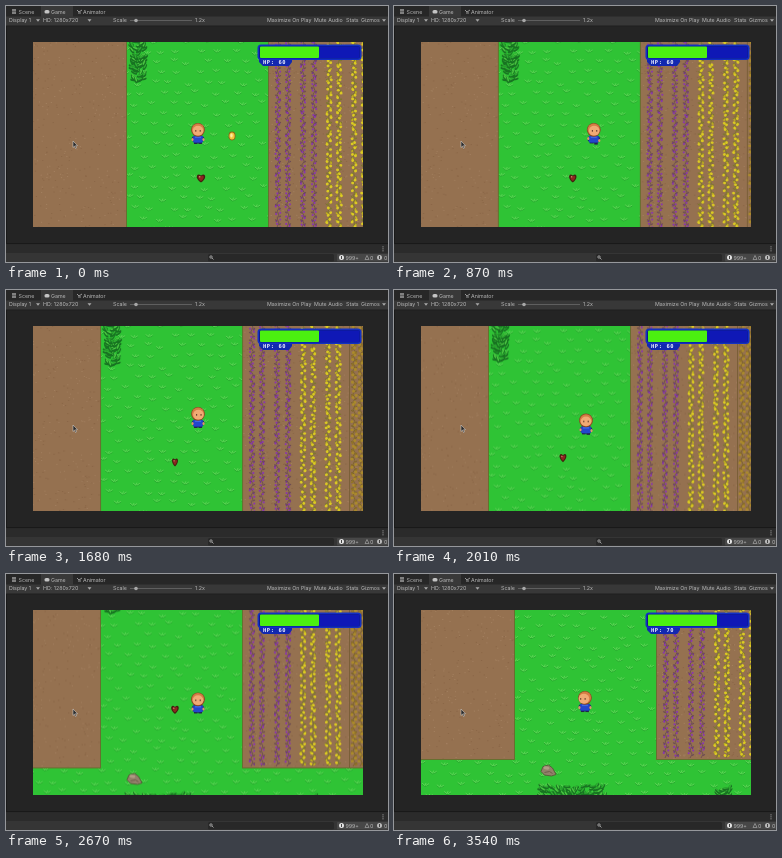
Write an HTML page with a canvas that moves like this. It is 382 px wide and 256 px high and loops after 3570 ms.

```html
<!DOCTYPE html>
<html lang="en">
<head>
<meta charset="utf-8">
<title>Farm game view</title>
<style>
  html, body { margin: 0; width: 100%; height: 100%; overflow: hidden; background: #242424; }
  canvas { position: absolute; left: 27px; top: 36px; width: 330px; height: 185px; }
  svg { position: absolute; left: 0; top: 0; }
  text { font: 5.3px Inter, "Open Sans", sans-serif; fill: #b9b9b9; }
  #hp { font: bold 5.4px "DejaVu Sans Mono", monospace; fill: #f2f4ff; letter-spacing: .6px; }
</style>
</head>
<body>
<canvas id="view" width="330" height="185"></canvas>
<svg width="382" height="256" viewBox="0 0 382 256">
  <rect width="382" height="11" fill="#272727"/>
  <rect x="35" width="32" height="11" fill="#393939"/>
  <rect y="10.5" width="382" height="9.5" fill="#383838"/>
  <rect y="19.5" width="382" height="1" fill="#1f1f1f"/>
  <rect y="20" width="1" height="217" fill="#191919"/>
  <rect y="237" width="382" height="1.2" fill="#191919"/>
  <rect y="238.2" width="382" height="9" fill="#2b2b2b"/>
  <rect y="247" width="382" height="9" fill="#353535"/>
  <rect x="202" y="248" width="126" height="7.5" rx="1.5" fill="#282828"/>
  <rect x="331" y="248" width="51" height="7.5" rx="1" fill="#474747"/>
  <g fill="none" stroke="#b4b4b4" stroke-width=".8">
    <path d="M6 4h4M6 7h4M7 3v5M9 3v5"/>
    <path d="M71 4l2 2 3-2M72 7h3"/>
    <circle cx="205" cy="251" r="1.2"/><path d="M206 252l1.5 1.5"/>
    <path d="M359 253.5l2-4 2 4z" stroke="#999"/>
    <path d="M124 14.5h62" stroke="#6a6a6a"/>
  </g>
  <rect x="38.5" y="4" width="5" height="3.6" rx="1.6" fill="#c4c4c4"/>
  <circle cx="130" cy="14.5" r="1.8" fill="#a8a8a8"/>
  <path d="M30 13.3h4l-2 2.4zM81.5 13.3h4l-2 2.4zM376 13.3h4l-2 2.4z" fill="#a8a8a8"/>
  <g fill="#aaa"><circle cx="377" cy="240.8" r=".6"/><circle cx="377" cy="242.8" r=".6"/><circle cx="377" cy="244.8" r=".6"/></g>
  <circle cx="335.5" cy="251.5" r="2.5" fill="#e4e4e4"/><rect x="335" y="250" width="1" height="3" fill="#444"/>
  <circle cx="373.5" cy="251.5" r="2.5" fill="#bbb"/><rect x="373" y="250" width="1" height="3" fill="#444"/>
  <text x="12.5" y="7.8">Scene</text>
  <text x="45" y="7.8">Game</text>
  <text x="77" y="7.8">Animator</text>
  <text x="3" y="16.3">Display 1</text>
  <text x="37" y="16.3">HD: 1280x720</text>
  <text x="107" y="16.3">Scale</text>
  <text x="189" y="16.3">1.2x</text>
  <text x="261" y="16.3">Maximize On Play</text>
  <text x="308" y="16.3">Mute Audio</text>
  <text x="340" y="16.3">Stats</text>
  <text x="355" y="16.3">Gizmos</text>
  <text x="339.5" y="253.5">999+</text>
  <text x="364" y="253.5">0</text>
  <text x="378" y="253.5">0</text>

  <path d="M253 52h33v4l-3 4h-26l-4-4z" fill="#1228b0"/>
  <rect x="251.5" y="38.5" width="104" height="15.5" rx="3.5" fill="#1230c4"/>
  <rect x="253" y="40" width="101" height="12.5" rx="2" fill="#0c1a8c"/>
  <rect x="254" y="40.5" width="99.5" height="11.5" rx="1" fill="#0f18b6"/>
  <rect id="bar" x="254" y="40.5" width="59" height="11.5" rx="1" fill="#4bf010"/>
  <text id="hp" x="257" y="58">HP: 60</text>
  <path d="M67 135v6.5l1.5-1.4 1 2.4 1-.5-1-2.3h2z" fill="#2a2a2a" stroke="#ddd" stroke-width=".5"/>
</svg>
<script>
const LOOP = 3570, STEP = 30, SPEED = 0.069, FOLLOW = 0.007;
const LEFT = 20, TOP = 30, SOIL_END = 231;
const view = document.getElementById('view').getContext('2d');
const bar = document.getElementById('bar'), hp = document.getElementById('hp');

let seed = 11;
const rnd = () => (seed = (seed * 16807) % 2147483647) / 2147483647;
const jitter = n => (rnd() - 0.5) * n;

function box(c, color, x, y, w, h) {
  c.fillStyle = color;
  c.fillRect(x, y, w, h);
}
function oval(c, color, x, y, rx, ry, turn = 0) {
  c.fillStyle = color;
  c.beginPath();
  c.ellipse(x, y, rx, ry, turn, 0, 7);
  c.fill();
}
function line(c, color, width, ...p) {
  c.strokeStyle = color;
  c.lineWidth = width;
  c.beginPath();
  for (let i = 0; i < p.length; i += 2) c.lineTo(p[i], p[i + 1]);
  c.stroke();
}

function soil(c, x0, x1) {
  box(c, '#957150', x0, TOP, x1 - x0, SOIL_END - TOP);
  for (let i = (x1 - x0) * 4; i > 0; i--) {
    const x = x0 + rnd() * (x1 - x0 - 1), y = TOP + rnd() * (SOIL_END - TOP - 1);
    box(c, i % 2 ? '#8a6647' : '#a48161', x, y, 1.2, 0.9);
  }
  c.strokeStyle = '#66702f';
  c.lineWidth = 1;
  c.strokeRect(x0 + 0.5, TOP - 5, x1 - x0 - 1, SOIL_END - TOP + 4.5);
}

function grass(c) {
  box(c, '#2fc335', LEFT, TOP, 380, 250);
  for (let row = 0, y = TOP + 4; y < 275; y += 10.5, row++) {
    for (let x = LEFT + (row % 2) * 9; x < 395; x += 18) {
      const u = x + jitter(9), v = y + jitter(5);
      line(c, '#26a62e', 0.9, u - 3, v, u, v + 2.2, u + 4, v + 0.5);
      line(c, '#66d95c', 0.8, u - 3, v - 1, u, v + 1.4, u + 1, v - 1.2);
      line(c, '#66d95c', 0.8, u + 1, v + 1.4, u + 4, v - 0.6);
    }
  }
}

function crop(c, x, stem, tips, size) {
  for (let y = TOP; y < SOIL_END - 4; y += 3.9) {
    const side = Math.round(y / 3.9) % 2 ? 1 : -1;
    line(c, stem, 0.9, x - side + jitter(1), y, x + side, y + 4);
    oval(c, stem, x - side * 2, y + 1, 1.3, 0.6, side * 0.6);
    oval(c, tips[0], x + side * 1.4 + jitter(2), y + jitter(3), size, size * 0.9, jitter(2));
    if (rnd() < 0.6) oval(c, tips[1], x - side * 1.8 + jitter(1), y + 2, size * 0.6, size, jitter(2));
  }
}

function bush(c, x, y, w, h) {
  for (let i = 0; i < w * h / 13; i++) {
    const u = x + 3 + rnd() * (w - 6), v = y + 2 + rnd() * (h - 4);
    const a = (u < x + w / 2 ? 0.6 : -0.6) + jitter(1.4);
    oval(c, '#187322', u, v + 0.7, 3.4, 1.5, a);
    oval(c, i % 2 ? '#2fae32' : '#4cc742', u, v - 0.3, 2.7, 0.8, a);
  }
}

function rock(c, x, y) {
  c.beginPath();
  c.moveTo(x - 7.5, y + 1);
  c.lineTo(x - 5.5, y - 4);
  c.lineTo(x, y - 5.5);
  c.lineTo(x + 4, y - 2.5);
  c.lineTo(x + 7.5, y + 4);
  c.lineTo(x + 3, y + 5.5);
  c.lineTo(x - 4, y + 4.5);
  c.closePath();
  c.fillStyle = '#92806a';
  c.fill();
  c.strokeStyle = '#565a38';
  c.lineWidth = 0.9;
  c.stroke();
  oval(c, '#b09c84', x - 2, y - 2.5, 3, 1.6, 0.2);
  line(c, '#6a5a48', 0.9, x - 4, y + 2, x + 1, y + 1, x + 4, y + 3);
}

function buildWorld() {
  const world = document.createElement('canvas');
  world.width = 380;
  world.height = 250;
  const c = world.getContext('2d');
  c.translate(-LEFT, -TOP);
  grass(c);
  soil(c, LEFT - 2, 121);
  soil(c, 262, 402);
  for (const x of [272, 282, 297, 308]) crop(c, x, '#6a4a55', ['#8a35b0', '#713096'], 1.1);
  for (const x of [323, 333, 348, 358]) crop(c, x, '#7a7a2a', ['#dccb22', '#c0b01e'], 1.5);
  box(c, '#7a5f38', 369, TOP, 1, SOIL_END - TOP);
  for (const x of [374, 381]) crop(c, x, '#7c6628', ['#ab8a2c', '#937426'], 1.6);
  bush(c, 122, 30, 20, 46);
  bush(c, 143, 254, 73, 18);
  bush(c, 319, 256, 20, 16);
  rock(c, 154.5, 241.5);
  return world;
}

// Moves along one axis: start, end, share of full speed with its sign.
const movesX = [[290, 435, 1], [668, 900, 1], [2780, 3000, -0.7], [3000, 3238, -1]];
const movesY = [[1850, 2402, 1], [2780, 2925, 0.7]];
const ramp = s => Math.max(0, s);
const lagged = s => s > 0 ? s - (1 - Math.exp(-FOLLOW * s)) / FOLLOW : 0;
const travel = (moves, t, f) =>
  moves.reduce((sum, [a, b, dir]) => sum + dir * SPEED * (f(t - a) - f(t - b)), 0);

function player(c, x, y, facing, walk) {
  const swing = walk ? Math.sin(walk / 45) : 0;
  c.save();
  c.translate(x, y);
  box(c, '#23254a', -4, 8, 3.5, 2 + swing * 0.6);
  box(c, '#23254a', 0.5, 8, 3.5, 2 - swing * 0.6);
  oval(c, '#1a2a78', 0, 5, 6.4, 4.2);
  box(c, '#2346cc', -4.8, 2, 9.6, 6.5);
  box(c, '#3f66e0', -3, 2.5, 6, 1.5);
  oval(c, '#e09a68', -5.5, 5.5 + swing, 1.1, 1.6);
  oval(c, '#e09a68', 5.5, 5.5 - swing, 1.1, 1.6);
  oval(c, '#8a4824', 0, -4.2, 6.9, 6.9);
  oval(c, '#d57d45', 0, -4.4, 6.1, 6.1);
  oval(c, '#f0aa74', facing, -3.3, 5.3, 4.9);
  for (const e of [-2.2, 2.2]) box(c, '#5a3424', facing * 2 + e - 0.5, -4, 1, 1.7);
  c.restore();
}

function heart(c, x, y, turn) {
  c.save();
  c.translate(x, y);
  c.scale(0.6 + 0.4 * turn, 0.95);
  const shape = (color, k) => {
    c.fillStyle = color;
    c.beginPath();
    c.moveTo(0, 4.6 * k);
    c.bezierCurveTo(-7 * k, -0.5 * k, -4 * k, -6.5 * k, 0, -2.8 * k);
    c.bezierCurveTo(4 * k, -6.5 * k, 7 * k, -0.5 * k, 0, 4.6 * k);
    c.fill();
  };
  shape('#43200f', 1);
  shape('#8c2620', 0.66);
  oval(c, '#d0806c', -1.3, -1.4, 0.8, 0.8);
  c.restore();
}

function coin(c, x, y, turn) {
  const w = 0.28 + 0.72 * turn;
  oval(c, '#8a6218', x, y, 3.5 * w, 4.4);
  oval(c, '#f2c63c', x, y, 2.7 * w, 3.6);
  oval(c, '#fdeaa0', x - 0.5 * w, y - 0.6, 1.2 * w, 2);
}

const world = buildWorld();

function draw(t) {
  const x = 192 + travel(movesX, t, ramp), y = 128 + travel(movesY, t, ramp);
  const camX = travel(movesX, t, lagged), camY = travel(movesY, t, lagged);
  const turn = Math.abs(Math.sin(Math.PI * (t - 570) / 1215));
  const walking = [...movesX, ...movesY].find(([a, b]) => t >= a && t < b);
  const facing = t > 2780 ? -1 : t > 290 && t < 1850 ? 0.4 : 0;
  const healed = t >= 3075;

  view.setTransform(1, 0, 0, 1, -27 - camX, -36 - camY);
  view.drawImage(world, LEFT, TOP);
  if (t < 850) coin(view, 226, 130, turn);
  if (!healed) heart(view, 195, 172.2, turn);
  player(view, x, y, facing, walking ? t - walking[0] : 0);

  bar.setAttribute('width', healed ? 69 : 59);
  hp.textContent = healed ? 'HP: 70' : 'HP: 60';
}

const start = performance.now();
function tick() {
  const t = (performance.now() - start) % LOOP;
  draw(Math.floor(t / STEP) * STEP);
  requestAnimationFrame(tick);
}
tick();
</script>
</body>
</html>
```
